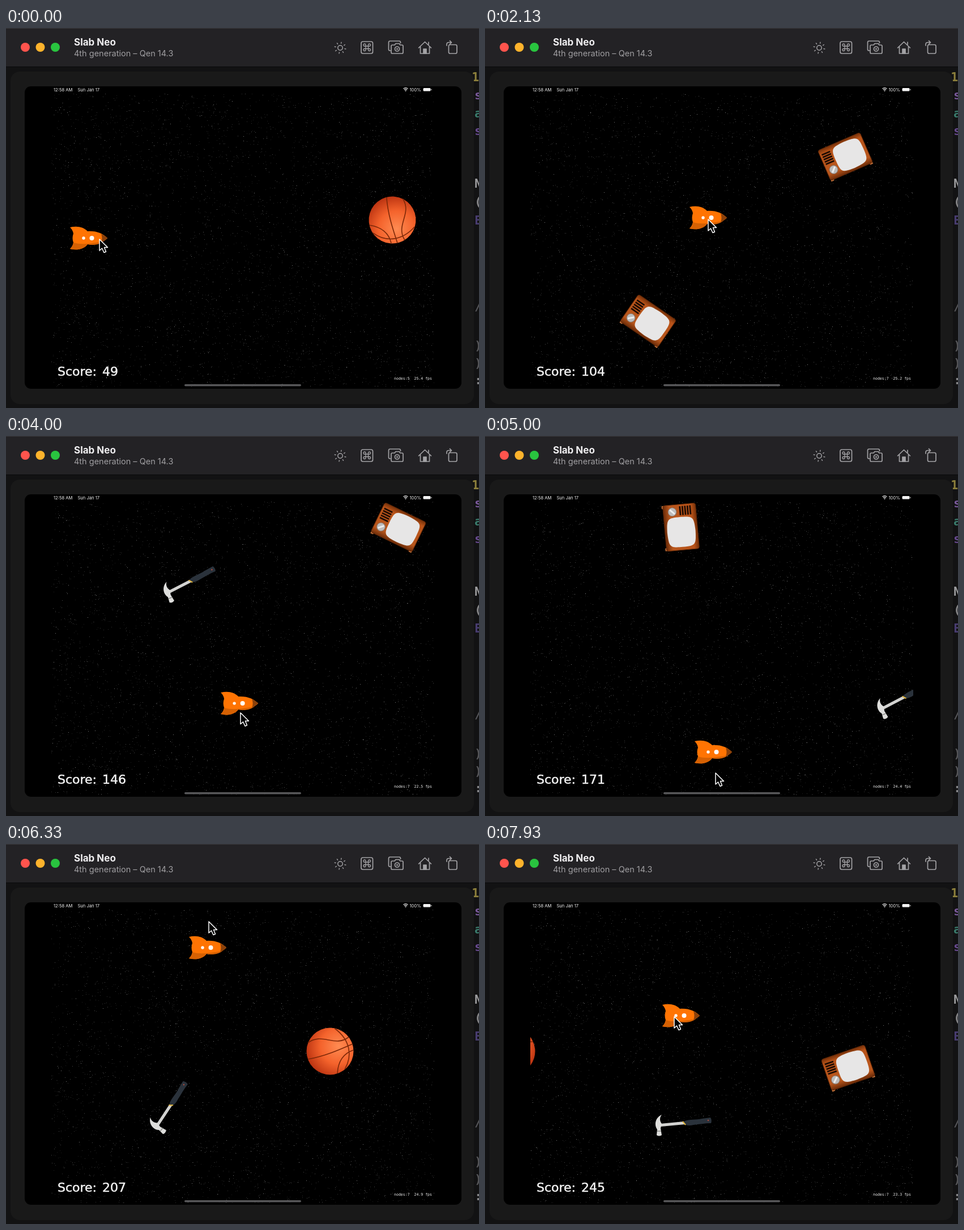
Recreate the animation shown at these times as an HTML page. Size 835 by 671 pixels, loop 8 s.

```html
<!DOCTYPE html>
<html lang="en">
<head>
<meta charset="utf-8">
<title>Space race</title>
<style>
html, body { margin: 0; width: 100%; height: 100%; overflow: hidden; background: #101012; }
svg { display: block; width: 835px; height: 671px; }
text { white-space: pre; font-family: Inter, Roboto, sans-serif; }
.mono { font-family: "DejaVu Sans Mono", monospace; }
#score { font: 22px "DejaVu Sans", sans-serif; word-spacing: 3px; stroke: #f4f4f4; stroke-width: .5; }
.icons { fill: none; stroke: #a3a2a5; stroke-width: 1.7; stroke-linecap: round; stroke-linejoin: round; }
</style>
</head>
<body>
<svg viewBox="0 0 835 671">
  <defs>
    <clipPath id="game"><rect x="80" y="104" width="676" height="532"/></clipPath>
    <radialGradient id="skin" gradientUnits="userSpaceOnUse" cx="15" cy="-9" r="58">
      <stop stop-color="#ff8b52"/><stop offset=".55" stop-color="#f4632c"/><stop offset="1" stop-color="#bd3512"/>
    </radialGradient>
    <linearGradient id="wood" x2="0" y2="1">
      <stop stop-color="#743009"/><stop offset=".15" stop-color="#b85319"/><stop offset=".8" stop-color="#b9571d"/><stop offset="1" stop-color="#6b2b08"/>
    </linearGradient>

    <g id="ball">
      <circle r="41.5" fill="url(#skin)"/>
      <path d="M-39-15C-14-34 8-6 33-25M-39 14C-10 9 15-2 40-13M8-40.5C36-20 40 8 26 32M41-2C20 5 14 22 13 39" fill="none" stroke="#7c2808" stroke-width="1.6"/>
    </g>

    <g id="tv">
      <path d="M-40 25h7l-2 6h-5zM40 25h-7l2 6h5z" fill="#c9753c"/>
      <rect x="-40.5" y="-29" width="81" height="58" rx="4" fill="url(#wood)" stroke="#5e2607"/>
      <path d="M-37-19h16m-16 4.500h16m-16 4.500h16m-16 4.500h16m-16 4.500h16" stroke="#1c0b03" stroke-width="2.700"/>
      <circle cx="-28" cy="13" r="7.500" fill="#bdbdbd" stroke="#8a6d5c"/>
      <path d="M-32 17l8-8" stroke="#eee" stroke-width="3"/>
      <path d="M-18 0C-18-23-16-24 8-25C33-24 35-23 35 0C35 23 33 24 8 25C-16 24-18 23-18 0Z" fill="#e7e6e6"/>
    </g>

    <g id="hammer">
      <path d="M-41 0L1-4 3 1-40 5Z" fill="#d3d3d1"/>
      <path d="M-38-16C-42-11-42-5-38 0L-40 8-38 20Q-43 23-47 20L-46 10C-51 4-51-10-38-16Z" fill="#dededc"/>
      <path d="M-46 13h7" stroke="#8c8c8a" stroke-width="1.500"/>
      <path d="M0-4C12-9 22-6 33-9L48-11Q51-6 49-1C38-1 28 1 18 2Q10 4 4 2Z" fill="#2a323b"/>
      <path d="M-1-4L4 2" stroke="#e0b43c" stroke-width="2"/>
      <circle cx="44" cy="-6" r="1.300" fill="#a54a3c"/>
    </g>

    <g id="ship">
      <path d="M-33-19C-21-22-9-20-2-12C14-13 25-8 33 0C25 8 14 14-2 11C-9 20-21 22-33 19Q-28 14-27 8Q-30 0-27-8Q-28-14-33-19Z" fill="#ff7403"/>
      <path d="M-27 8C-10 13 12 8 26 6C18 12 8 13-2 11C-9 20-21 22-33 19Q-28 14-27 8Z" fill="#d66103"/>
      <path d="M22-7.500Q29-4 33 0Q29 4 22 8Q25 0 22-7.500Z" fill="#8b410b"/>
      <circle cx="-9" r="2.700" fill="#fff"/><circle cx="5.500" r="4" fill="#fff"/>
    </g>
  </defs>

  <rect width="835" height="671" fill="#121213"/>
  <g id="code" class="mono" font-size="22" font-weight="700"></g>
  <rect width="835" height="68" fill="#232225"/>
  <path d="M0 .5H835" stroke="#39383b"/>
  <path d="M0 68.500H835" stroke="#09090a"/>
  <circle cx="34" cy="34" r="8" fill="#ff544d"/>
  <circle cx="60.500" cy="34" r="8" fill="#fdb32c"/>
  <circle cx="87" cy="34" r="8" fill="#29c43f"/>
  <text x="120" y="31" font-size="17" font-weight="700" fill="#f0eff1">Slab Neo</text>
  <text x="120" y="50" font-size="14.500" fill="#a09fa2">4th generation – Qen 14.3</text>

  <g class="icons">
    <circle cx="590" cy="35" r="4.200" stroke-width="1.500"/>
    <path id="rays" stroke-width="1.400"/>
    <rect x="627" y="24" width="20.500" height="21" rx="3"/>
    <path stroke-width="1.300" d="M635 32h4.500v4.500h-4.500zM635 32h-2a2 2 0 1 1 2-2zM639.500 32v-2a2 2 0 1 1 2 2zM639.500 36.500h2a2 2 0 1 1-2 2zM635 36.500v2a2 2 0 1 1-2-2z"/>
    <path d="M679 40h-1q-2.500 0-2.500-2.500v-12q0-2.500 2.500-2.500h16q2.500 0 2.500 2.500v1"/>
    <path d="M682 30h4l2-2.500h6l2 2.500h3q2 0 2 2v11q0 2-2 2h-17q-2 0-2-2v-11q0-2 2-2z"/>
    <circle cx="690.500" cy="37" r="4"/><circle cx="690.500" cy="37" r=".7"/>
    <path d="M728.500 35L739.500 24.500 750.500 35M731.500 33v12h16v-12M746 29v-4"/>
    <path d="M737 45v-8h5v8z" fill="#a3a2a5"/>
    <rect x="781.500" y="29.500" width="14.500" height="15.500" rx="2.500"/>
    <path d="M778 31v-2q0-3.500 3.500-3.500h5M783.500 22.500l3 3-3 3"/>
  </g>

  <rect x="8" y="77" width="818" height="587" rx="16" fill="#191919"/>
  <rect x="33" y="103" width="771" height="534" rx="11"/>

  <g clip-path="url(#game)">
    <g id="stars" shape-rendering="crispEdges" fill="none"></g>
    <g id="things"></g>
    <use id="rocket" href="#ship"/>
  </g>

  <g fill="#f4f4f4">
    <text id="score" x="91" y="613.500"></text>
    <text id="stats" class="mono" x="685" y="620.500" font-size="6.550"></text>
    <g font-size="7.600">
      <text x="84" y="111.500">12:58 AM</text>
      <text x="126.500" y="111.500">Sun Jan 17</text>
      <text x="712.500" y="111.500">100%</text>
    </g>
    <rect x="736.500" y="106" width="13" height="5.600" rx="1.500"/>
    <rect x="750.500" y="107.800" width="1" height="2"/>
    <path d="M701.500 107.300q4-3.300 8 0M703 109.200q2.500-2 5 0" fill="none" stroke="#f4f4f4" stroke-width="1.200"/>
    <circle cx="705.500" cy="110.800" r="1"/>
  </g>
  <rect x="315" y="629" width="206" height="3.600" rx="1.800" fill="#58585a"/>
  <path id="cursor" d="M0 0V20L4.500 16 8 23.500 11.500 22 8.500 14.500H14.500Z" fill="#000" stroke="#fff" stroke-width="1.500" stroke-linejoin="round"/>
</svg>

<script>
const LOOP = 8000, LEFT = 80, WIDTH = 676, SPIN = 0.868;
const $ = id => document.getElementById(id);

const ticks = [0, 100, 600, 760, 910, 1070, 1370, 1560, 1750, 1940, 2130, 2600, 2770, 2930, 3100,
  3400, 3590, 3790, 3980, 4170, 4530, 4800, 5000, 5200, 5330, 5800, 5920, 6030, 6330,
  6600, 6770, 6930, 7100, 7400, 7570, 7750, 7930];

// time, distance flown, score, rocket x y, cursor x y, fps
const keys = [
  [0, 0, 49, 146, 371, 165, 373, 25.4],
  [1070, 350, 74, 232, 502, 247, 499, 24.8],
  [2130, 719, 104, 394, 335, 394, 338, 25.2],
  [3100, 1056, 125, 420, 398, 420, 397, 22.5],
  [5000, 1702, 171, 403, 558, 407, 595, 24.4],
  [6330, 2150, 207, 356, 183, 358, 137, 24.9],
  [7930, 2675, 245, 346, 303, 334, 305, 23.3]
];

// kind, starting x, y
const things = [
  ["ball", 682, 339], ["tv", 1007, 517], ["tv", 1355, 227], ["hammer", 1680, 258], ["tv", 2048, 161],
  ["hammer", 2441, 463], ["ball", 2722, 366], ["hammer", 3025, 494], ["tv", 3316, 395]
];
// x at which each kind stands at angle zero
const upright = { ball: 572, tv: 663, hammer: 350 };

function add(parent, name, attrs, text = "") {
  const el = document.createElementNS("http://www.w3.org/2000/svg", name);
  for (const k in attrs) el.setAttribute(k, attrs[k]);
  el.textContent = text;
  return parent.appendChild(el);
}
const move = (el, x, y, turn = 0) => el.setAttribute("transform", `translate(${x} ${y}) rotate(${turn})`);

let seed = 17;
const random = () => (seed = seed * 16807 % 2147483647) / 2147483647;

// speed, opacity, number of stars
const layers = [[0.17, 0.12, 2200], [0.25, 0.2, 1500], [0.36, 0.3, 650], [0.5, 0.48, 200]].map(([speed, alpha, count]) => {
  let d = "";
  for (let i = 0; i < count; i++) {
    const x = Math.floor(random() * WIDTH), y = 116 + Math.floor(random() * 518) + 0.5;
    d += `M${x} ${y}h1M${x + WIDTH} ${y}h1`;
  }
  return { speed, el: add($("stars"), "path", { d, stroke: "#fff", "stroke-opacity": alpha }) };
});

const sprites = things.map(([kind, x, y]) => ({ kind, x, y, el: add($("things"), "use", { href: "#" + kind }) }));

let rays = "";
for (let i = 0; i < 8; i++) {
  const a = i * Math.PI / 4 + 0.2, c = Math.cos(a), s = Math.sin(a);
  rays += `M${590 + 8 * c} ${35 + 8 * s}L${590 + 10 * c} ${35 + 10 * s}`;
}
$("rays").setAttribute("d", rays);

// Editor text peeking out at the right edge
[["1", 94, "#8d803c", 822], ["s", 126, "#79589a"], ["a", 158, "#397a6b"], ["s", 189, "#67498e"],
 ["N", 282, "#9b9b9d"], ["(", 314, "#858587"], ["E", 347, "#483c70"], ["/", 499, "#555558"],
 [")", 568, "#555558"], [")", 599, "#555558"], [":", 629, "#858587"]]
  .forEach(([char, y, fill, x = 827]) => add($("code"), "text", { x, y, fill, class: "mono" }, char));

function draw(now) {
  const time = now % LOOP;
  const t = ticks.findLast(v => v <= time);
  const i = Math.min(keys.findLastIndex(k => k[0] <= t), keys.length - 2);
  const a = keys[i], b = keys[i + 1], f = (t - a[0]) / (b[0] - a[0]);
  const [, flown, score, x, y, cx, cy] = a.map((v, n) => v + (b[n] - v) * f);

  for (const s of sprites) {
    const sx = s.x - flown;
    s.el.style.display = sx > 10 && sx < 850 ? "" : "none";
    move(s.el, sx, s.y, (sx - upright[s.kind]) * SPIN);
  }
  for (const l of layers) move(l.el, LEFT - Math.round(flown * l.speed) % WIDTH, 0);
  move($("rocket"), x, y);
  move($("cursor"), cx, cy);
  $("score").textContent = "Score: " + Math.round(score);
  const fps = (f < 1 ? a : b)[7].toFixed(1);
  $("stats").textContent = `nodes:${t < 1000 ? 5 : t < 2000 ? 6 : 7}  ${fps} fps`;
}

function loop() {
  draw(performance.now());
  requestAnimationFrame(loop);
}
loop();
</script>
</body>
</html>
```
